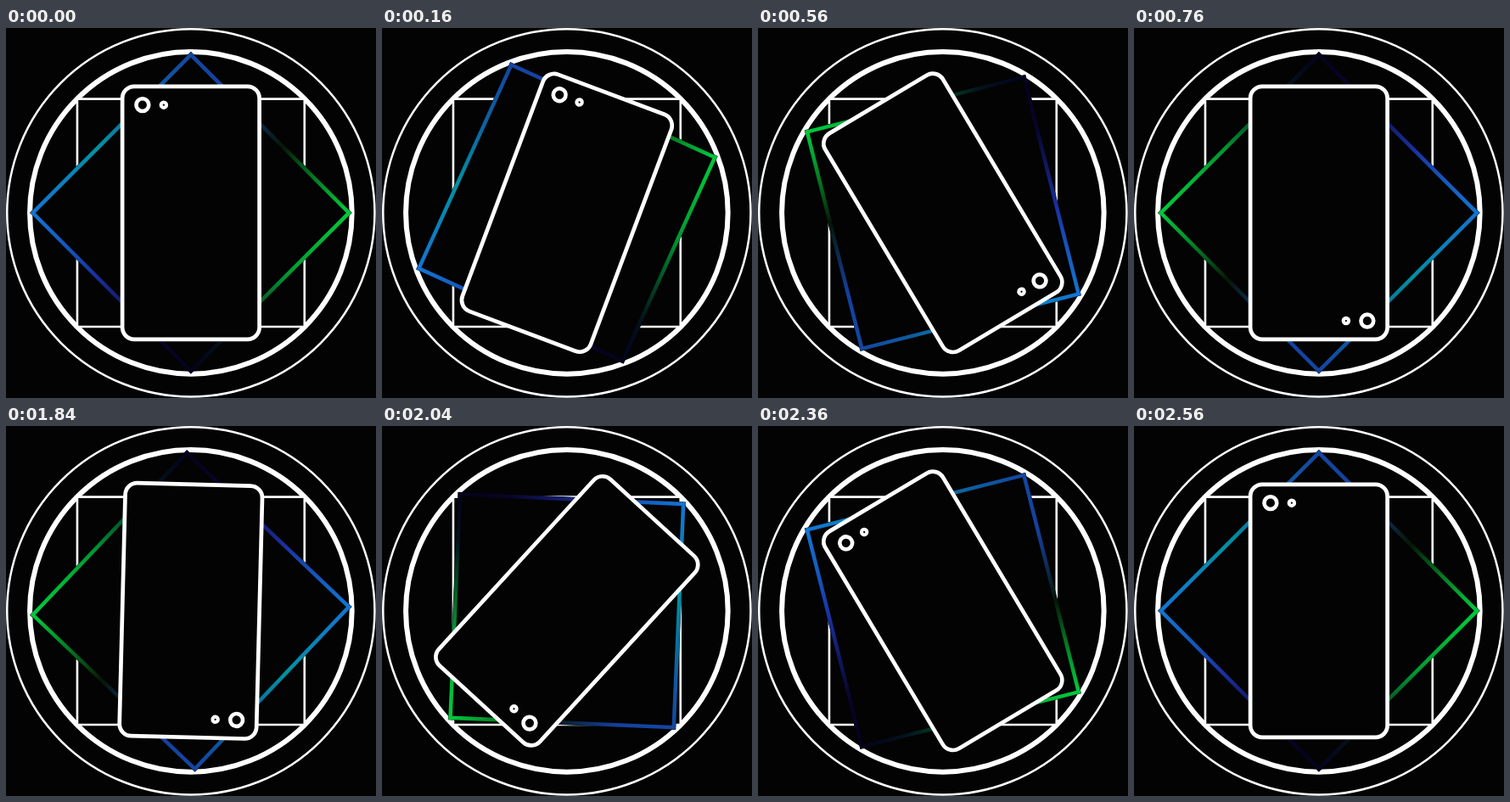
Write an HTML page with a canvas that moves like this. It is 436 by 436 pixels and loops after 3400 ms.

```html
<!DOCTYPE html>
<html lang="en">
<head>
<meta charset="utf-8">
<title>Rotating phone</title>
<style>
  html, body { margin: 0; width: 100%; height: 100%; overflow: hidden; background: #030303; }
  canvas { display: block; width: 436px; height: 436px; }
</style>
</head>
<body>
<canvas id="stage" width="436" height="436"></canvas>
<script>
const ctx = document.getElementById('stage').getContext('2d');
const BLACK = '#030303', WHITE = '#fff';
const LOOP = 3400, STEP = 40, TURN = 760, SECOND = 1800;
const CENTER = 217.85;

// Key colours around the diamond, clockwise from the right corner.
// Positions count sides: 1 is the bottom corner, 2 the left, 3 the top.
const COLORS = {
  0: '#00c83c', 0.4: '#009632', 0.8: '#04121c',
  1: '#04021c', 1.22: '#080428', 1.6: '#1a30a0',
  2: '#1274d2', 2.4: '#0092a2',
  3: '#1446a0', 3.25: '#1440a0', 3.58: '#061605', 4: '#00c83c'
};

const rainbow = ctx.createConicGradient(0, 0, 0);
for (const [key, color] of Object.entries(COLORS)) {
  const side = Math.floor(key), f = key - side;
  rainbow.addColorStop(side / 4 + Math.atan2(f, 1 - f) / (2 * Math.PI), color);
}

function paint(width, color, fill) {
  if (fill) {
    ctx.fillStyle = fill;
    ctx.fill();
  }
  ctx.lineWidth = width;
  ctx.strokeStyle = color;
  ctx.stroke();
}

function ring(x, y, r, width) {
  ctx.beginPath();
  ctx.arc(x, y, r, 0, 2 * Math.PI);
  paint(width, WHITE, BLACK);
}

function box(w, h, r, width) {
  ctx.beginPath();
  ctx.roundRect(-w / 2, -h / 2, w, h, r);
  paint(width, WHITE, BLACK);
}

function turned(angle, draw) {
  ctx.save();
  ctx.rotate(angle);
  draw();
  ctx.restore();
}

function diamond() {
  const r = 186.3;
  ctx.beginPath();
  ctx.moveTo(r, 0);
  ctx.lineTo(0, r);
  ctx.lineTo(-r, 0);
  ctx.lineTo(0, -r);
  ctx.closePath();
  paint(5.2, BLACK, BLACK);
  paint(4.5, rainbow);
}

function phone() {
  box(161.5, 298, 14, 4.7);
  ring(-57, -127.2, 7.4, 4.6);
  ring(-32, -127.2, 3.2, 4.1);
}

const ease = u => u * u * (3 - 2 * u);
const progress = (t, start) => ease(Math.min(1, Math.max(0, (t - start) / TURN)));

function render(now) {
  const t = Math.floor((now % LOOP) / STEP) * STEP;
  const angle = Math.PI * (progress(t, 0) + progress(t, SECOND));

  ctx.setTransform(1, 0, 0, 1, 0, 0);
  ctx.fillStyle = BLACK;
  ctx.fillRect(0, 0, 436, 436);
  ctx.translate(CENTER, CENTER);

  ring(0, 0, 216.6, 2.5);
  ring(0, 0, 189.8, 6);
  box(267.8, 268.4, 0, 2.6);

  turned(-angle, diamond);
  turned(angle, phone);
}

let begin;
function tick() {
  const now = performance.now();
  begin ??= now;
  render(now - begin);
  requestAnimationFrame(tick);
}
tick();
</script>
</body>
</html>
```
